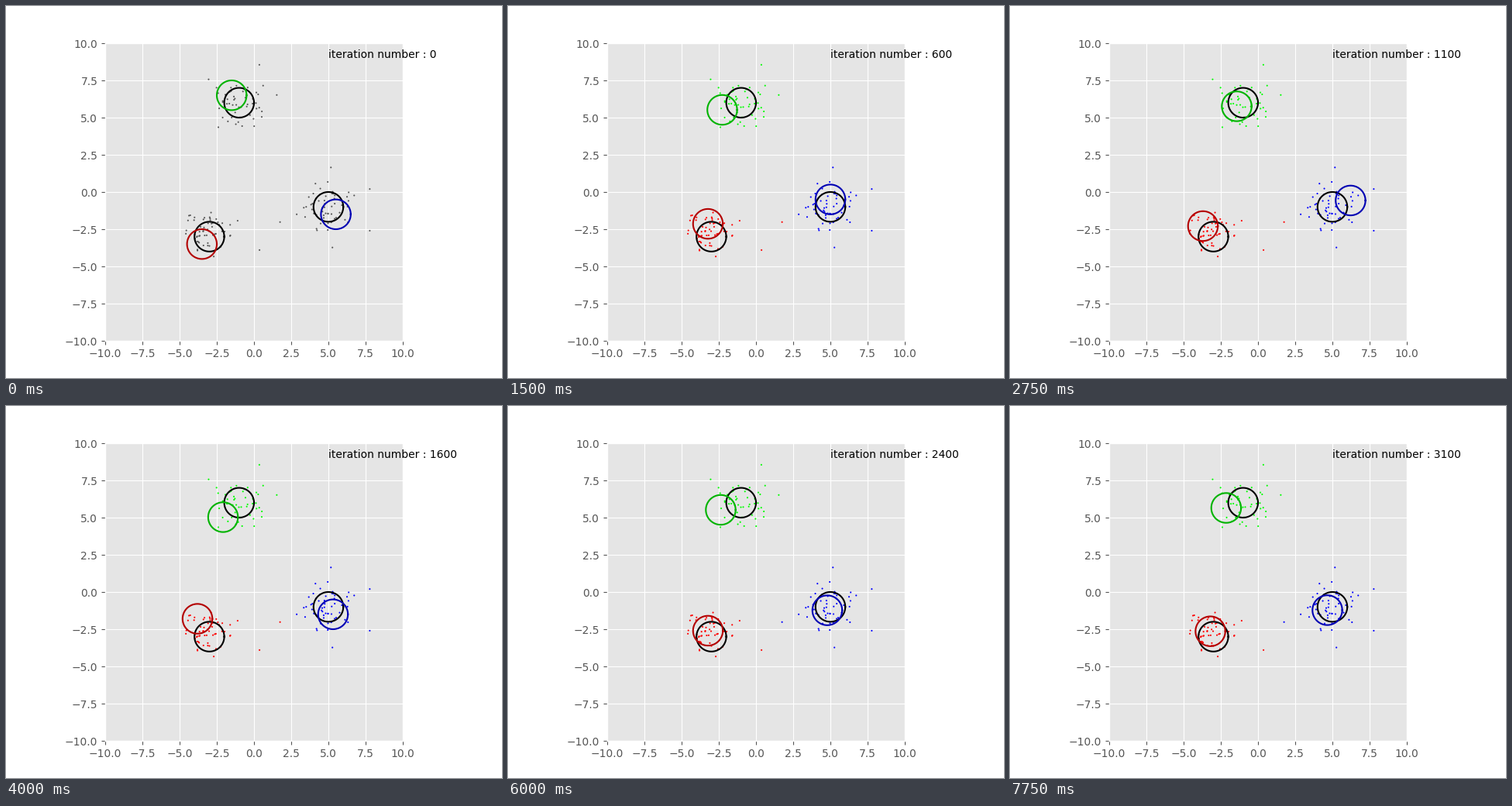
Write a matplotlib script that moves like this. It is 640 px wide and 480 px high and loops after 8 s.

```python
import numpy as np
import matplotlib.pyplot as plt
from matplotlib.animation import FuncAnimation

FRAMES, INTERVAL = 32, 250
STEP = 100            # iterations per frame
SWITCH = 1800         # iteration at which the midway point joins blue
RED, GREEN, BLUE = range(3)

plt.rcParams.update({"font.family": "DejaVu Sans", "font.size": 10})
rng = np.random.default_rng(4)


def cloud(mean, spread, count, outliers):
    """Normal cloud kept within two deviations, plus its outliers."""
    noise = rng.normal(size=(4 * count, 2))
    noise = noise[np.hypot(*noise.T) < 2][:count]
    return np.vstack([mean + spread * noise, outliers])


TRUE_MEANS = [(-3, -3), (-1, 6), (5, -1)]
clouds = [
    cloud((-3.1, -2.8), 0.9, 56, [(0.37, -3.9), (-1.1, -1.93), (1.75, -2.02)]),
    cloud((-1, 6), 1.1, 48, [(0.36, 8.55), (1.53, 6.52), (-3.05, 7.57)]),
    cloud((5.1, -1), 0.95, 55, [(7.78, 0.2), (7.78, -2.6), (5.17, 1.65),
                                (5.27, -3.73), (2.87, -1.5)]),
]
points = np.vstack(clouds)
owner = np.repeat([RED, GREEN, BLUE], [len(c) for c in clouds])
midway = len(clouds[RED]) - 1

# Estimated means at the key iterations
KEY_TIMES = np.array([0, 600, 1100, 1600, 2000, 2400, 3100])
PATHS = np.array([
    [(-3.5, -3.5), (-3.23, -2.14), (-3.7, -2.29), (-3.8, -1.8),
     (-3.39, -2.46), (-3.23, -2.6), (-3.2, -2.64)],
    [(-1.5, 6.5), (-2.27, 5.52), (-1.43, 5.76), (-2.08, 5.03),
     (-2.34, 5.43), (-2.37, 5.52), (-2.14, 5.65)],
    [(5.5, -1.5), (5.0, -0.5), (6.22, -0.57), (5.31, -1.5),
     (4.84, -1.33), (4.79, -1.23), (4.66, -1.22)],
])


def along(path, it):
    """Smooth curve through the keys (cubic Hermite)."""
    t = KEY_TIMES
    slope = np.gradient(path, t, axis=0)
    k = min(np.searchsorted(t, it, side="right") - 1, len(t) - 2)
    h = t[k + 1] - t[k]
    u = (it - t[k]) / h
    return ((1 + 2 * u) * (1 - u) ** 2 * path[k] + u * (1 - u) ** 2 * h * slope[k]
            + u * u * (3 - 2 * u) * path[k + 1] + u * u * (u - 1) * h * slope[k + 1])


fig = plt.figure(figsize=(6.4, 4.8), dpi=100, facecolor="white")
ax = fig.add_axes([0.2, 0.1, 0.6, 0.8], facecolor="#E5E5E5")
ax.set(xlim=(-10, 10), ylim=(-10, 10))
ticks = np.arange(-10, 10.1, 2.5)
ax.set_xticks(ticks)
ax.set_yticks(ticks)
ax.tick_params(color="#555555", labelcolor="#555555")
ax.grid(color="white", linewidth=0.8)
ax.set_axisbelow(True)
for spine in ax.spines.values():
    spine.set(color="white", linewidth=1)

angle = np.linspace(0, 2 * np.pi, 100)
ring = np.column_stack([np.cos(angle), np.sin(angle)])


def circle(center, color):
    return ax.plot(*(ring + center).T, color=color, linewidth=1.5)[0]


dots = ax.scatter(*points.T, s=2.3, linewidths=0)
for mean in TRUE_MEANS:
    circle(mean, "black")
rings = [circle(path[0], color) for path, color in zip(PATHS, 0.7 * np.eye(3))]
label = ax.text(5, 9, "", color="black")


def point_colors(it):
    """Even grey before the first assignment, then one hue per group."""
    if it == 0:
        return np.full((len(points), 3), 1 / 3)
    group = owner.copy()
    group[midway] = BLUE if it >= SWITCH else RED
    return np.eye(3)[group]


def update(frame):
    it = frame * STEP
    dots.set_facecolor(point_colors(it))
    for line, path in zip(rings, PATHS):
        line.set_data(*(ring + along(path, it)).T)
    label.set_text(f"iteration number : {it}")
    return [dots, label, *rings]


anim = FuncAnimation(fig, update, frames=FRAMES, interval=INTERVAL,
                     repeat=True, repeat_delay=0)
plt.show()
```
